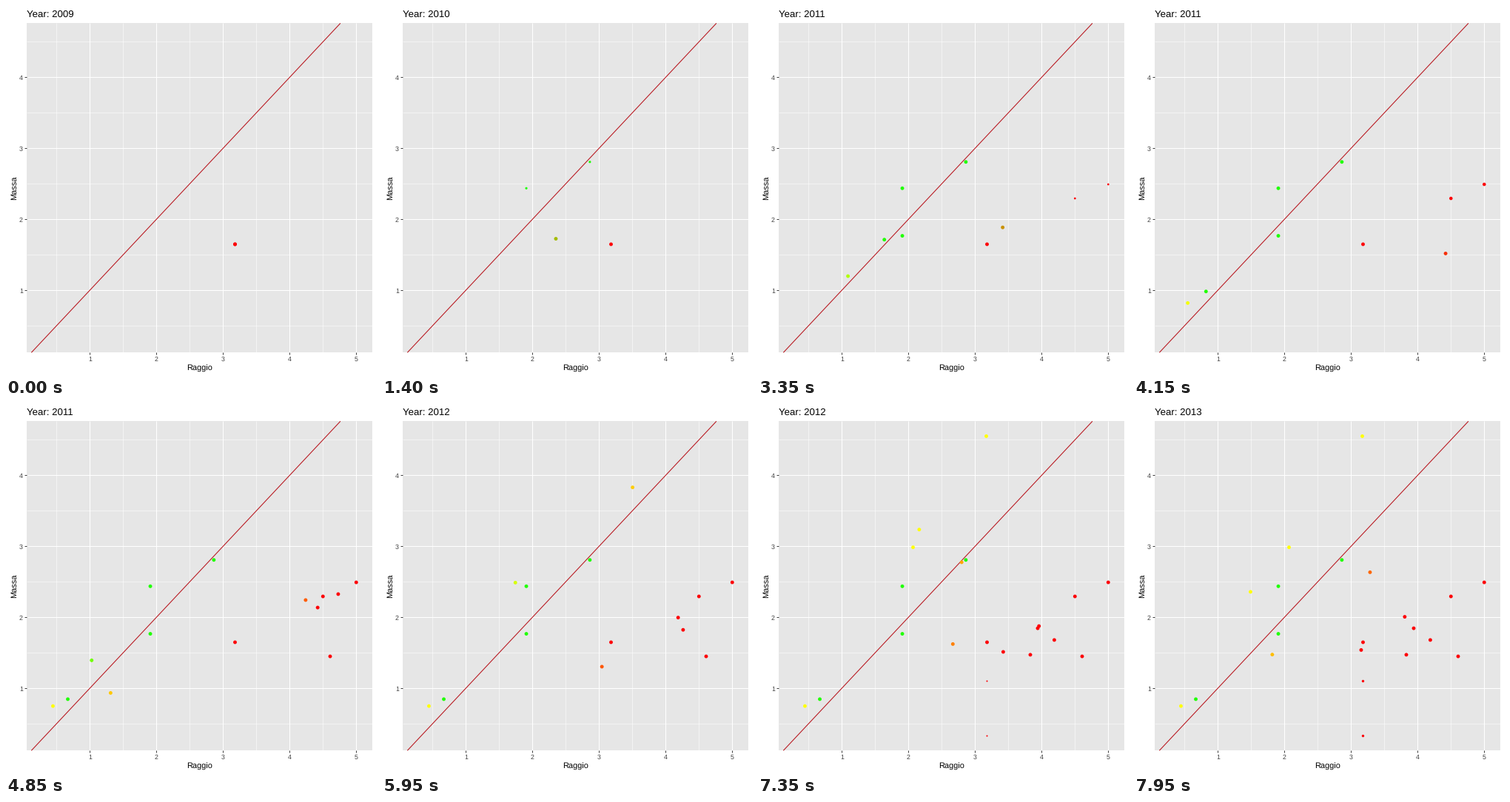
Recreate the animation shown at these times as a matplotlib script. Size 500x500 px, loop 8 s.

```python
import numpy as np
import matplotlib.pyplot as plt
from matplotlib.animation import FuncAnimation
from matplotlib.patches import Rectangle

SIZE, DPI = 500, 100
FRAMES, INTERVAL = 160, 50
YEAR_FRAMES = 43
PT = 72 / DPI              # points per pixel
RADIUS = 2.45
LEFT, TOP, RIGHT, BOTTOM = 28, 23.3, 494.5, 468.3

RED = (0.99, 0.0175, 0.05)
GREEN = (0.18, 1.0, 0.045)
YELLOW = (1.0, 1.0, 0.07)

# Per year: x, y, colour. Row k moves to row k of the next year; extra rows grow in.
YEARS = [
    [(3.18, 1.648, RED)],
    [(1.908, 1.767, GREEN), (1.908, 2.437, GREEN), (2.862, 2.808, GREEN)],
    [(0.446, 0.749, YELLOW), (4.608, 1.449, RED), (0.669, 0.846, GREEN),
     (4.50, 2.294, RED), (5.00, 2.492, RED)],
    [(3.830, 1.472, RED), (3.169, 4.552, YELLOW), (2.069, 2.986, YELLOW),
     (4.190, 1.680, RED), (3.941, 1.845, RED)],
    [(2.858, 1.568, RED), (0.763, 1.408, YELLOW), (3.812, 2.482, RED),
     (3.640, 2.148, RED), (0.897, 1.314, YELLOW),
     (3.18, 1.100, RED), (3.18, 0.328, RED)],
]

TO_XYZ = np.array([[0.4124, 0.3576, 0.1805],
                   [0.2126, 0.7152, 0.0722],
                   [0.0193, 0.1192, 0.9505]])
WHITE = TO_XYZ.sum(axis=1)


def px(v):
    return 23.3 + 90 * v


def py(v):
    return 480 - 95.9 * v


def to_lab(rgb):
    c = np.array(rgb)
    c = np.where(c > 0.04045, ((c + 0.055) / 1.055) ** 2.4, c / 12.92)
    t = TO_XYZ @ c / WHITE
    f = np.where(t > 0.008856, np.cbrt(t), 7.787 * t + 16 / 116)
    return np.array([116 * f[1] - 16, 500 * (f[0] - f[1]), 200 * (f[1] - f[2])])


def to_rgb(lab):
    fy = (lab[0] + 16) / 116
    f = np.array([fy + lab[1] / 500, fy, fy - lab[2] / 200])
    t = np.where(f > 0.2069, f ** 3, (f - 16 / 116) / 7.787)
    c = np.clip(np.linalg.solve(TO_XYZ, t * WHITE), 0, 1)
    return np.where(c > 0.0031308, 1.055 * c ** (1 / 2.4) - 0.055, 12.92 * c)


def mix(a, b, u):
    """Blend in Lab, then apply the display tone curve."""
    lab = (1 - u) * to_lab(a) + u * to_lab(b)
    return np.clip(to_rgb(lab), 0, 1) ** 1.2


def points_at(frame):
    """Rows of (x, y, radius, colour): past years first, moving points on top."""
    k, step = divmod(frame, YEAR_FRAMES)
    u = step / YEAR_FRAMES
    rows = [(x, y, RADIUS, mix(c, c, 0))
            for year in YEARS[:k + 1] for x, y, c in year]
    now = YEARS[k]
    for i, (x, y, c) in enumerate(YEARS[k + 1]):
        if i < len(now):
            x0, y0, c0 = now[i]
            rows.append((x0 + (x - x0) * u, y0 + (y - y0) * u,
                         RADIUS, mix(c0, c, u)))
        else:
            rows.append((x, y, RADIUS * u, mix(c, c, 0)))
    return rows


plt.rcParams["font.family"] = "Liberation Sans"
plt.rcParams["text.hinting"] = "none"

fig = plt.figure(figsize=(SIZE / DPI, SIZE / DPI), dpi=DPI, facecolor="white")
ax = fig.add_axes([0, 0, 1, 1])
ax.set_xlim(0, SIZE)
ax.set_ylim(SIZE, 0)
ax.axis("off")


def line(x0, y0, x1, y1, color, width, z):
    ax.plot([x0, x1], [y0, y1], color=color, lw=width * PT,
            solid_capstyle="butt", zorder=z)


def label(x, y, text, size, color="black", **kw):
    return ax.text(x, y, text, fontsize=size * PT, color=color,
                   va="baseline", **kw)


ax.add_patch(Rectangle((LEFT, TOP), RIGHT - LEFT, BOTTOM - TOP,
                       facecolor="#e6e6e6", lw=0, zorder=0))

for v in np.arange(0.5, 5.1, 0.5):
    major = v == int(v)
    width = 1.0 if major else 0.55
    line(px(v), TOP, px(v), BOTTOM, "white", width, 1 + major)
    if v < 4.7:
        line(LEFT, py(v), RIGHT, py(v), "white", width, 1 + major)
    if major:
        name = str(int(v))
        line(px(v), BOTTOM, px(v), BOTTOM + 2.75, "#282828", 0.9, 3)
        label(px(v), 480, name, 8.8, "#404040", ha="center")
        if v < 4.7:
            line(LEFT - 2.75, py(v), LEFT, py(v), "#282828", 0.9, 3)
            label(22.9, py(v) + 3.4, name, 8.8, "#404040", ha="right")

low, high = (480 - BOTTOM) / 95.9, (480 - TOP) / 95.9
line(px(low), BOTTOM, px(high), TOP, "#b8141c", 1.05, 4)

title = label(28, 15, "", 13.2, ha="left")
label(261.2, 493, "Raggio", 11, ha="center")
label(13.5, 246, "Massa", 11, ha="center", rotation=90, rotation_mode="anchor")

dots = ax.scatter([], [], linewidths=0, zorder=5)


def draw(frame):
    x, y, r, colors = zip(*points_at(frame))
    dots.set_offsets(np.column_stack([px(np.array(x)), py(np.array(y))]))
    dots.set_sizes((2 * np.array(r) * PT) ** 2)
    dots.set_facecolors(colors)
    title.set_text(f"Year: {2009 + int(frame / YEAR_FRAMES + 0.5)}")
    return dots, title


anim = FuncAnimation(fig, draw, frames=FRAMES, interval=INTERVAL,
                     repeat=True, repeat_delay=0, blit=False)
plt.show()
```
